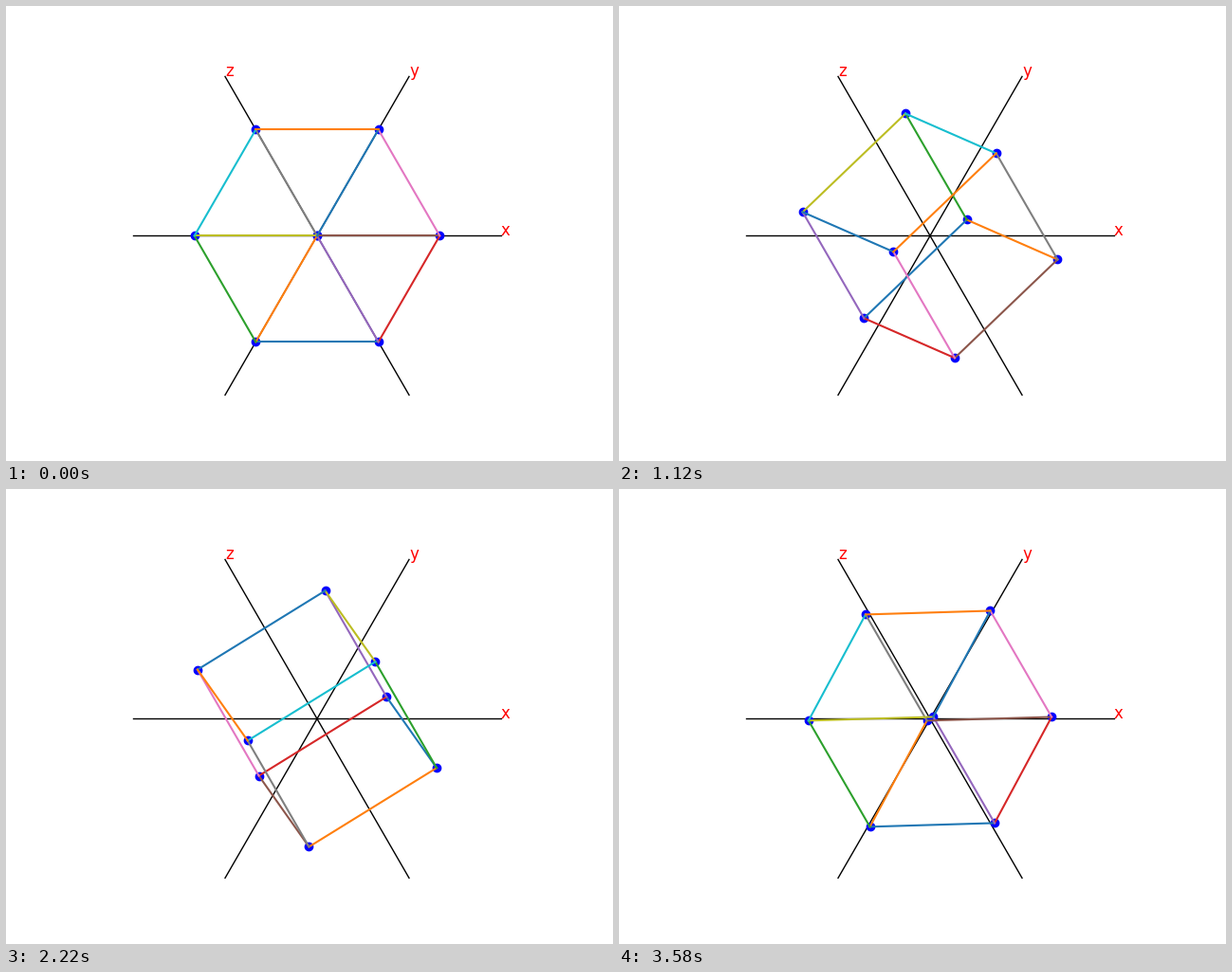
Write a matplotlib script that moves like this. It is 640 px wide and 480 px high and loops after 3600 ms.

```python
from itertools import combinations

import numpy as np
import matplotlib.pyplot as plt
from matplotlib.animation import FuncAnimation

FRAMES = 180
INTERVAL = 20
AXIS_LEN = 1.5
H = np.sqrt(3) / 2

# Columns are the screen directions of the x, y and z axes.
PROJECTION = np.array([[1, 0.5, -0.5],
                       [0, H, H]])

RING = [(-0.5, -0.5), (0.5, -0.5), (0.5, 0.5), (-0.5, 0.5)]
CUBE = np.array([(x, y, z) for z in (-0.5, 0.5) for x, y in RING])
EDGES = [(i, j) for i, j in combinations(range(8), 2)
         if np.isclose(np.abs(CUBE[i] - CUBE[j]).sum(), 1)]


def rotate_z(points, angle):
    c, s = np.cos(angle), np.sin(angle)
    return points @ np.array([[c, s, 0], [-s, c, 0], [0, 0, 1]]).T


def project(points):
    return PROJECTION @ points.T


fig, ax = plt.subplots(figsize=(6.4, 4.8), dpi=100)
ax.axis("off")
half_height = 1.1 * AXIS_LEN * H
half_width = half_height * (0.775 * 640) / (0.77 * 480)
ax.set_xlim(-half_width, half_width)
ax.set_ylim(-half_height, half_height)

for name, (dx, dy) in zip("xyz", AXIS_LEN * PROJECTION.T):
    ax.plot([-dx, dx], [-dy, dy], color="k", lw=1)
    ax.text(dx, dy, name, color="r", fontsize=12)

corners, = ax.plot([], [], "bo")
edges = [ax.plot([], [], color=f"C{k % 10}")[0] for k in range(len(EDGES))]


def update(frame):
    angle = -2 * np.pi * frame / FRAMES
    # A negative angle turns the cube clockwise, seen from +z.
    xs, ys = project(rotate_z(CUBE, -angle))
    corners.set_data(xs, ys)
    for line, (i, j) in zip(edges, EDGES):
        line.set_data([xs[i], xs[j]], [ys[i], ys[j]])
    return [corners, *edges]


anim = FuncAnimation(fig, update, frames=FRAMES, interval=INTERVAL,
                     repeat=True, repeat_delay=0)
plt.show()
```
